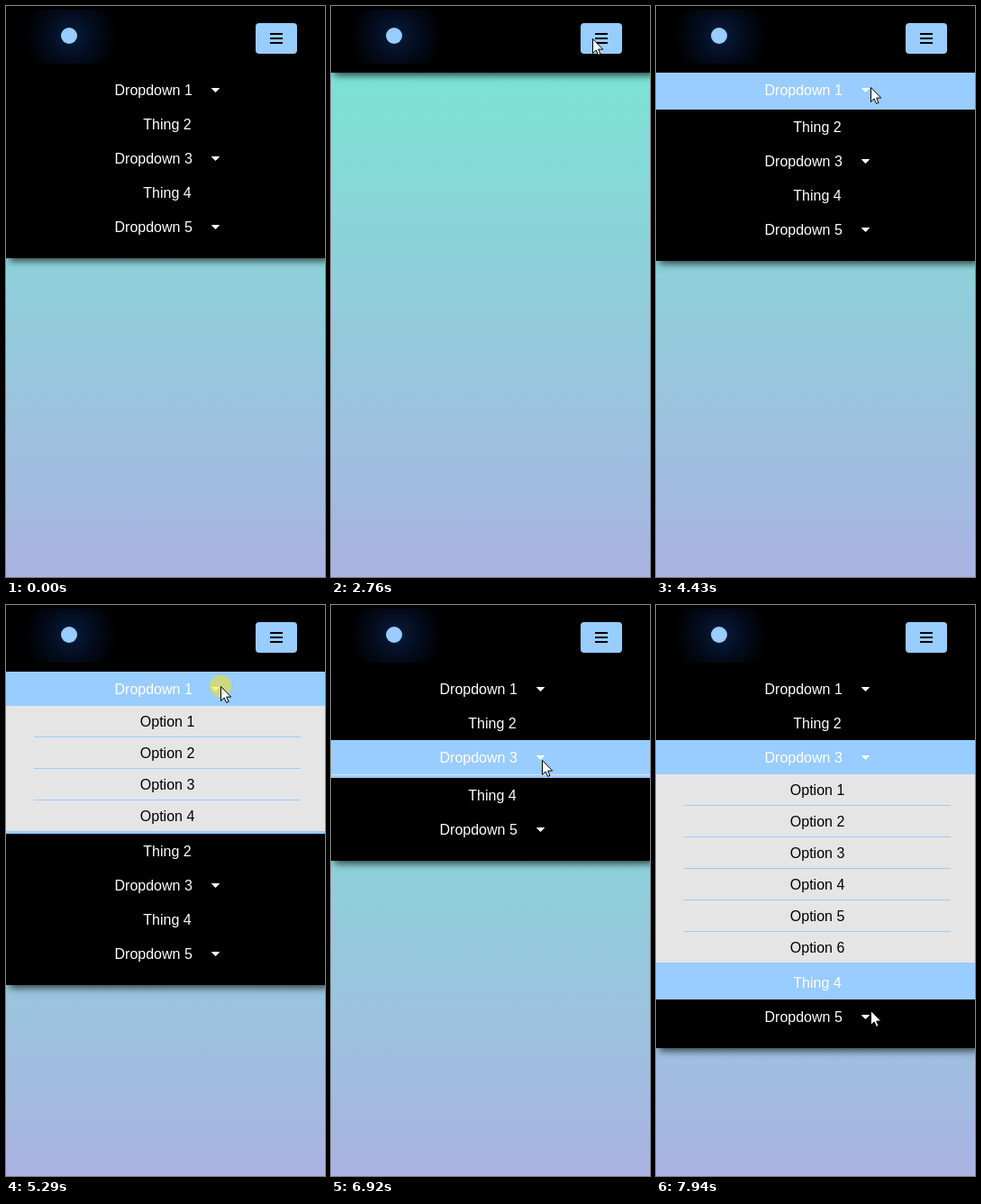
Write an HTML page with a canvas that moves like this. It is 354 px wide and 634 px high and loops after 8 s.

```html
<!DOCTYPE html>
<html lang="en">
<head>
<meta charset="utf-8">
<title>Dropdown menu</title>
<style>
  html, body { margin: 0; height: 100%; overflow: hidden; background: #000; }
  canvas { display: block; }
</style>
</head>
<body>
<canvas id="stage" width="354" height="634"></canvas>
<script>
const W = 354, H = 634, LOOP = 8000, LAST = 7940;
const BLUE = '#99ccff', GREY = '#e5e5e5';
const HEADER = 74, ROW = 38, OPTION = 35, MENU = 206;
const ctx = document.getElementById('stage').getContext('2d');

const items = [
  { label: 'Dropdown 1', options: 4 },
  { label: 'Thing 2' },
  { label: 'Dropdown 3', options: 6 },
  { label: 'Thing 4' },
  { label: 'Dropdown 5', options: 4 }
];

// Pointer path: time, x, y
const path = [
  [630, 317, 19], [800, 290, 36], [3480, 290, 36], [3780, 238, 90],
  [5750, 238, 90], [5980, 238, 147], [6380, 238, 147], [6530, 234, 172],
  [7470, 234, 172], [7940, 238, 450]
];
const clicks = [[1280, 1340], [2680, 2760], [4040, 4110], [5290, 5350], [6530, 6610]];

const arrow = new Path2D('M.5.5V16.5L4.2 13L6.6 18.4L9 17.4L6.7 12.1H11.7Z');
const hand = new Path2D('M-1 2Q1-1 3 2V8L9 10Q11.500 11 11 15L9 22.500H1L-4.500 14Q-4 10.500-1 13.500Z');

const clamp = (v, lo, hi) => Math.min(hi, Math.max(lo, v));

// The CSS "ease" curve
function ease(x) {
  x = clamp(x, 0, 1);
  let lo = 0, hi = 1;
  for (let i = 0; i < 24; i++) {
    const s = (lo + hi) / 2, r = 1 - s;
    if (0.75 * r * s * (r + s) + s ** 3 < x) lo = s; else hi = s;
  }
  const s = lo, r = 1 - s;
  return 0.3 * r * r * s + 3 * r * s * s + s ** 3;
}
const glide = (t, start) => ease((t - start) / 500);

const menuShift = t => Math.round(MENU * (glide(t, 1654) - glide(t, 3130)));

// Submenus animate max-height up to 500px, so they are cut at their own height
function subHeight(i, t) {
  const open = i === 0 ? glide(t, 4424) - glide(t, 5705)
             : i === 2 ? glide(t, 6913.5) : 0;
  return open ? Math.round(Math.min(items[i].options * OPTION + 2, 500 * open)) : 0;
}

function pointer(t) {
  if (t < path[0][0]) return null;
  const n = path.findIndex(p => p[0] > t);
  if (n < 0) return { x: 238, y: 450 };
  const [t0, x0, y0] = path[n - 1], [t1, x1, y1] = path[n];
  const k = (t - t0) / (t1 - t0);
  return { x: x0 + (x1 - x0) * k, y: y0 + (y1 - y0) * k };
}

function layout(t) {
  let y = HEADER - menuShift(t);
  return items.map((item, i) => {
    const row = { ...item, y, sub: subHeight(i, t) };
    row.end = y += ROW + row.sub;
    return row;
  });
}

const over = (row, p) => p && p.y >= HEADER && p.y >= row.y && p.y < row.end;

function box(color, x, y, w, h) {
  ctx.fillStyle = color;
  ctx.fillRect(x, y, w, h);
}

function text(str, x, y, color) {
  ctx.fillStyle = color;
  ctx.fillText(str, x, y);
}

function shape(p, fill, stroke) {
  ctx.fillStyle = fill;
  ctx.strokeStyle = stroke;
  ctx.fill(p);
  ctx.stroke(p);
}

function disc(x, y, r, color) {
  ctx.fillStyle = color;
  ctx.beginPath();
  ctx.arc(x, y, r, 0, 7);
  ctx.fill();
}

function clipped(y, h, draw) {
  ctx.save();
  ctx.beginPath();
  ctx.rect(0, y, W, h);
  ctx.clip();
  draw();
  ctx.restore();
}

function drawRow(row, hot) {
  const { y, sub, label, options } = row;
  if (hot) box(BLUE, 0, y, W, ROW);
  text(label, options ? 120.5 : 152.3, y + 25, '#fff');
  if (options) shape(new Path2D(`M228.500 ${y + 17.5}h8l-4 4z`), '#fff', '#fff');
  if (!sub) return;
  clipped(y + ROW, sub, () => {
    box(GREY, 0, y + ROW, W, sub);
    for (let i = 0; i < options; i++) {
      const top = y + ROW + i * OPTION;
      text('Option ' + (i + 1), 148.8, top + 23, '#000');
      if (i < options - 1) box(BLUE, 31, top + OPTION - 1, 296, 1);
    }
    if (hot) box(BLUE, 0, row.end - 3, W, 3);
  });
}

function drawHeader() {
  const glow = ctx.createRadialGradient(72, 33, 4, 72, 33, 52);
  glow.addColorStop(0, '#081a38');
  glow.addColorStop(0.5, '#030b1c');
  glow.addColorStop(1, '#000');
  box(glow, 20, 4, 104, 60);
  disc(70, 33, 9, BLUE);

  ctx.fillStyle = BLUE;
  ctx.beginPath();
  ctx.roundRect(277, 19, 46, 34, 4);
  ctx.fill();
  for (const y of [30, 35, 40]) box('#000', 293, y, 14, 2);
}

function draw(t) {
  const rows = layout(t);
  const bottom = rows[rows.length - 1].end + 16;

  const sky = ctx.createLinearGradient(0, 0, 0, H);
  sky.addColorStop(0, '#76e9d3');
  sky.addColorStop(1, '#aab3e2');
  box(sky, 0, 0, W, H);

  ctx.save();
  ctx.shadowColor = 'rgba(0,0,0,.7)';
  ctx.shadowBlur = 8;
  ctx.shadowOffsetX = 4;
  ctx.shadowOffsetY = 3;
  box('#000', 0, 0, W, bottom);
  ctx.restore();

  // Highlights trail the pointer slightly
  const trail = [pointer(t - 70), pointer(t - 150)];
  ctx.font = '16px "Liberation Sans", Arial, sans-serif';
  ctx.lineJoin = 'round';
  ctx.lineWidth = 1;
  clipped(HEADER, H, () => {
    for (const row of rows) drawRow(row, trail.some(p => over(row, p)));
  });
  drawHeader();

  const p = pointer(t);
  if (!p) return;
  if (clicks.some(([a, b]) => t >= a && t < b)) disc(p.x, p.y, 12, 'rgba(255,230,0,.5)');
  const link = rows.some(r => over(r, p) && (!r.options || p.y >= r.y + ROW));
  ctx.save();
  ctx.translate(Math.round(p.x), Math.round(p.y));
  shape(link ? hand : arrow, '#fff', '#000');
  ctx.restore();
}

const begin = performance.now();
function tick() {
  draw(Math.min((performance.now() - begin) % LOOP, LAST));
  requestAnimationFrame(tick);
}
tick();
</script>
</body>
</html>
```
